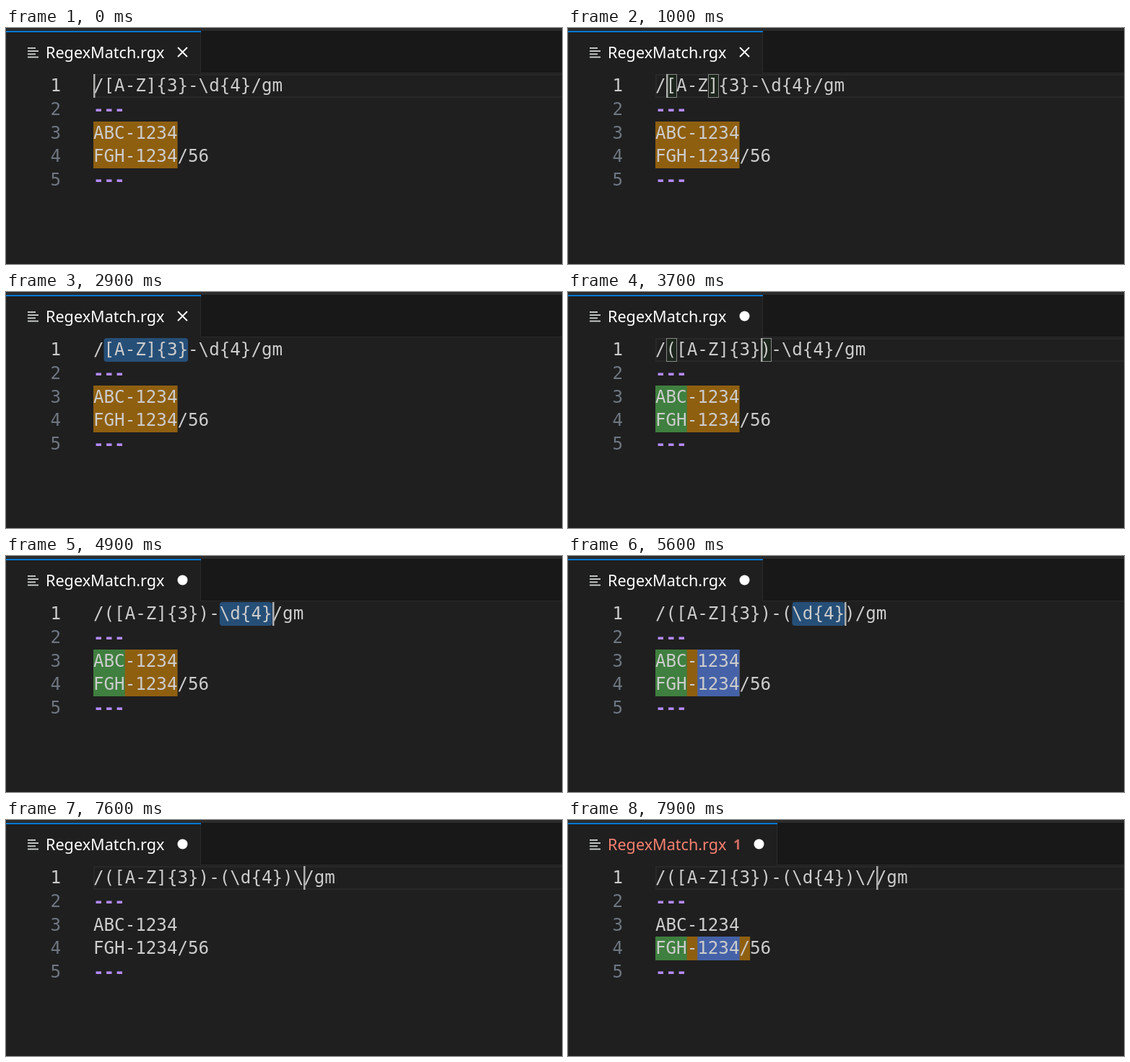
Animation of 770x328 px, one loop 8000 ms. Source, as an HTML page with a canvas:

```html
<!DOCTYPE html>
<html lang="en">
<head>
<meta charset="utf-8">
<style>
  html, body { margin: 0; height: 100%; overflow: hidden; background: #1f1f1f; }
  canvas { display: block; }
</style>
</head>
<body>
<canvas id="stage" width="770" height="328"></canvas>
<script>
const ctx = document.getElementById('stage').getContext('2d');
const LOOP = 8000, LEFT = 121, TOP = 64, CHAR = 14.57, LINE = 32.8;
const CODE = '24.2px "DejaVu Sans Mono", monospace';
const UI = '"Noto Sans", sans-serif';
const GROUP_COLORS = ['#8f5f10', '#3f7f3f', '#4562a8'];
const SAMPLE = ['ABC-1234', 'FGH-1234/56'];
const TEXTS = [
  '/[A-Z]{3}-\\d{4}/gm',
  '/([A-Z]{3})-\\d{4}/gm',
  '/([A-Z]{3})-(\\d{4})/gm',
  '/([A-Z]{3})-(\\d{4})\\/gm',
  '/([A-Z]{3})-(\\d{4})\\//gm'
];

// Each step holds until the next one; a caret of null is blinked off.
const steps = [];
const step = (time, text, caret, extra = {}) => steps.push({ time, text, caret, ...extra });
const select = (time, text, from, to) => {
  for (let end = from + 1; end <= to; end++, time += 100)
    step(time, text, end, { sel: [from, end] });
};

step(0, 0, 0);
step(200, 0, null);
step(700, 0, 0);
step(800, 0, 1, { pair: [1, 5] });
select(1200, 0, 1, 9);
step(2400, 0, null, { sel: [1, 9] });
step(3000, 1, 10, { sel: [2, 10] });
step(3400, 1, 10, { pair: [1, 10] });
step(3800, 1, 11, { pair: [1, 10] });
step(3900, 1, 12);
select(4100, 1, 12, 17);
step(5000, 1, null, { sel: [12, 17] });
step(5400, 2, 18, { sel: [13, 18] });
step(5800, 2, 18, { pair: [12, 18] });
step(6400, 2, null, { pair: [12, 18] });
step(7100, 2, 19, { pair: [12, 18] });
step(7600, 3, 20);
step(7700, 4, 21, { error: true });

const colX = col => LEFT + col * CHAR;
const rowY = row => Math.round(TOP + row * LINE);

function rect(x, y, w, h, color) {
  ctx.fillStyle = color;
  ctx.fillRect(x, y, w, h);
}

function text(str, x, y, color, font = CODE, align = 'left') {
  ctx.font = font;
  ctx.textAlign = align;
  ctx.fillStyle = color;
  ctx.fillText(str, x, y);
}

function drawTab(error, dirty) {
  const width = error ? 289 : 269;
  rect(0, 0, 770, 4, '#2b2b2b');
  rect(0, 4, 770, 58, '#181818');
  rect(0, 62, 770, 1, '#2b2b2b');
  rect(0, 4, width, 60, '#1f1f1f');
  rect(width, 4, 1, 59, '#2b2b2b');
  rect(0, 4, width + 1, 2, '#0078d4');
  rect(0, 6, 1, 322, '#2b2b2b');
  [11, 15, 11, 15].forEach((w, i) => rect(30, 27 + i * 4.2, w, 1.8, '#d0d4d4'));
  text('RegexMatch.rgx', 55, 42, error ? '#f88070' : '#ffffff', '21.6px ' + UI);
  if (error) text('1', 229, 41, '#cd6c60', '600 19px ' + UI);

  const x = width - 24.5, y = 33.5;
  ctx.beginPath();
  if (dirty) {
    ctx.arc(x, y, 7, 0, Math.PI * 2);
    ctx.fillStyle = '#fff';
    ctx.fill();
  } else {
    for (const s of [-1, 1]) {
      ctx.moveTo(x - 6.5, y - 6.5 * s);
      ctx.lineTo(x + 6.5, y + 6.5 * s);
    }
    ctx.strokeStyle = '#fff';
    ctx.lineWidth = 1.8;
    ctx.stroke();
  }
}

function drawMatches(pattern) {
  const body = /^\/((?:\\.|[^\\\/])*)\/gm$/.exec(pattern);
  if (!body) return;
  SAMPLE.forEach((line, i) => {
    const match = new RegExp(body[1], 'd').exec(line);
    if (!match) return;
    const y = rowY(i + 2), h = rowY(i + 3) - y;
    match.indices.forEach(([from, to], group) =>
      rect(colX(from), y, (to - from) * CHAR, h, GROUP_COLORS[group]));
  });
}

function drawFirstLine({ sel, pair }) {
  if (sel) {
    ctx.beginPath();
    ctx.roundRect(colX(sel[0]), TOP, (sel[1] - sel[0]) * CHAR, 33, 4);
    ctx.fillStyle = '#264f78';
    ctx.fill();
    return;
  }
  ctx.strokeStyle = '#282828';
  ctx.lineWidth = 2;
  ctx.strokeRect(LEFT + 1, TOP + 1, 700, 31);
  for (const col of pair || []) {
    const x = Math.round(colX(col));
    rect(x, TOP, 15, 33, '#1c261c');
    ctx.strokeStyle = '#888888';
    ctx.lineWidth = 1;
    ctx.strokeRect(x + .5, TOP + .5, 14, 32);
  }
}

function draw(time) {
  const state = steps.findLast(s => s.time <= time);
  const pattern = TEXTS[state.text];
  rect(0, 0, 770, 328, '#1f1f1f');
  drawTab(state.error, state.text > 0);
  drawMatches(pattern);
  drawFirstLine(state);
  [pattern, '---', ...SAMPLE, '---'].forEach((line, row) => {
    const y = 88 + row * LINE, rule = line === '---';
    text(row + 1, 76, y, row ? '#6e7681' : '#cccccc', CODE, 'right');
    text(line, LEFT, y, rule ? '#b48aff' : '#cccccc', rule ? 'bold ' + CODE : CODE);
  });
  if (state.caret !== null) rect(Math.round(colX(state.caret)), TOP, 2.5, 33, '#aeafad');
}

function frame() {
  draw(performance.now() % LOOP);
  requestAnimationFrame(frame);
}
frame();
</script>
</body>
</html>
```
